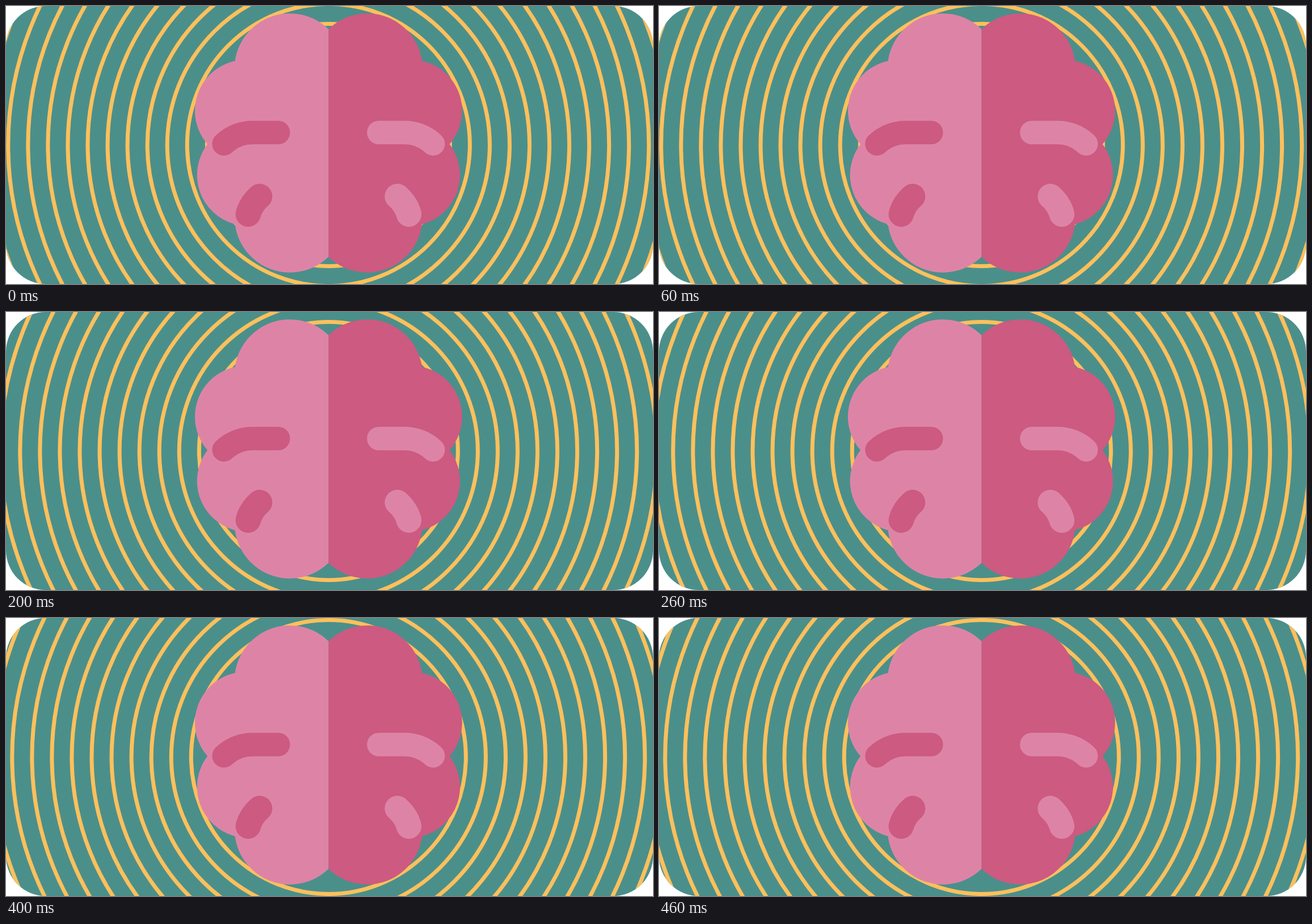
An HTML page for the animation above (0.5 s loop, 1140 by 491 pixels).

```html
<!DOCTYPE html>
<html lang="en">
<head>
<meta charset="utf-8">
<title>Pulsing rings</title>
<style>
  html, body { margin: 0; width: 100%; height: 100%; overflow: hidden; background: #fff; }
  svg { display: block; width: 1140px; height: 491px; }
  .half { fill: var(--body); }
  .fold { fill: none; stroke: var(--fold); stroke-linecap: round; }
  .left { --body: #dd84a6; --fold: #cd5a80; }
  .right { --body: #cd5a80; --fold: #dd84a6; }
</style>
</head>
<body>
<svg viewBox="0 0 1140 491">
  <defs>
    <clipPath id="card"><rect width="1140" height="491" rx="70"/></clipPath>
    <g id="side">
      <path class="half" d="M568.25 41A97.5 97.5 0 0 0 403.5 97A90 90 0 0 0 355 244A90 90 0 0 0 403.5 385.5A97.5 97.5 0 0 0 568.25 443Z"/>
      <path class="fold" stroke-width="41.5" d="M479.7 223.5H438A73 73 0 0 0 384 243.5"/>
      <path class="fold" stroke-width="44.5" d="M447 336.2Q431.5 350 426.7 367.7"/>
    </g>
  </defs>
  <g clip-path="url(#card)">
    <rect width="1140" height="491" fill="#4b8f8b"/>
    <g id="rings" fill="none" stroke="#fdc05c" stroke-width="7"></g>
    <use class="right" href="#side" transform="translate(1136.5 0) scale(-1 1)"/>
    <use class="left" href="#side"/>
  </g>
</svg>
<script>
  const COUNT = 13, INNER = 214, GAP = 35.05;
  const STEPS = 5, STEP_MS = 100;
  const group = document.getElementById('rings');

  const rings = Array.from({ length: COUNT }, () => {
    const ring = document.createElementNS('http://www.w3.org/2000/svg', 'circle');
    ring.setAttribute('cx', 568.25);
    ring.setAttribute('cy', 245.5);
    return group.appendChild(ring);
  });

  // Each loop grows every ring by one gap, in hard steps.
  function draw(time) {
    const step = Math.floor(time / STEP_MS) % STEPS;
    rings.forEach((ring, i) => ring.setAttribute('r', INNER + GAP * (i + step / STEPS)));
  }

  const start = performance.now();
  function tick() {
    draw(performance.now() - start);
    requestAnimationFrame(tick);
  }
  tick();
</script>
</body>
</html>
```
